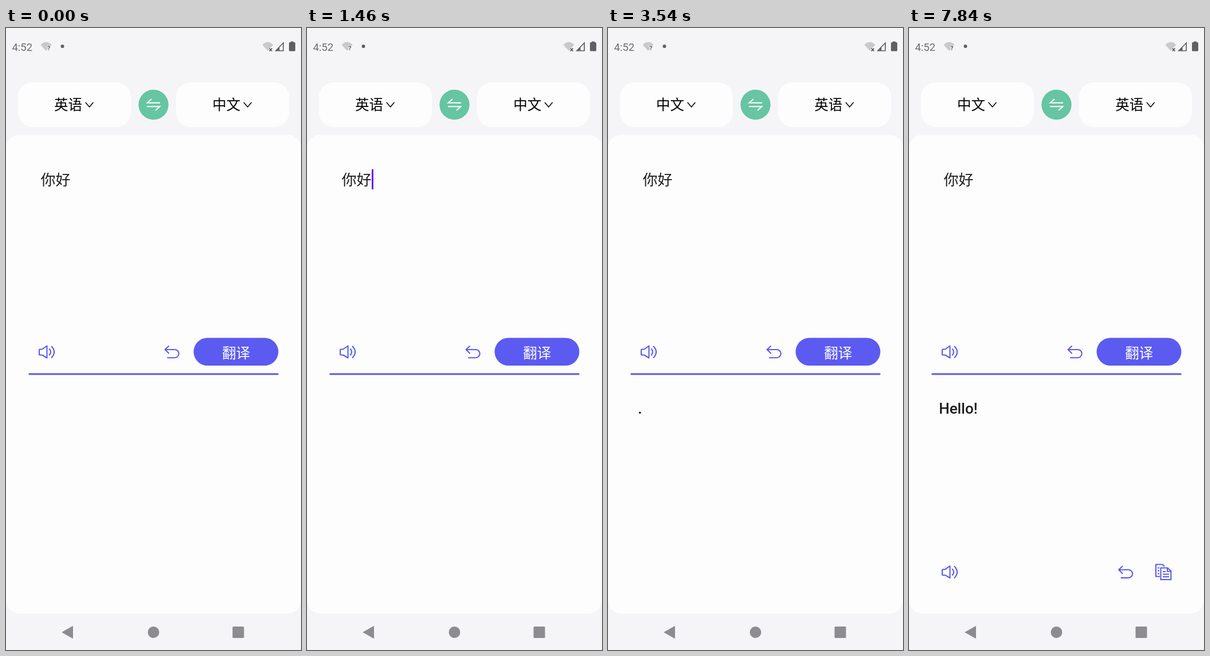
An HTML page that plays this animation: 515 by 1087 pixels, repeating every 8000 ms.

```html
<!DOCTYPE html>
<html lang="zh-CN">
<head>
<meta charset="utf-8">
<style>
html, body { margin: 0; width: 100%; height: 100%; overflow: hidden; background: #f5f5f7; }
svg { display: block; width: 515px; height: 1087px; }
.cjk { font-family: "Noto Sans CJK SC", "Noto Sans CJK", sans-serif; }
.label { font-size: 24.5px; font-weight: 500; }
.latin { font-family: Roboto, sans-serif; }
.icon { fill: none; stroke: #5c5cea; stroke-width: 2.1; stroke-linecap: round; stroke-linejoin: round; }
</style>
</head>
<body>
<svg viewBox="0 0 515 1087" xmlns="http://www.w3.org/2000/svg">
  <defs>
    <g id="speaker" class="icon">
      <path d="M58 562.5V570.5Q58 571.5 59 571.5H63L71.5 576.5V555.5L63 561.5H59Q58 561.5 58 562.5Z"/>
      <path d="M75.8 561Q80.4 566 75.8 571.5M79.6 556.5Q88.6 566 79.6 576"/>
    </g>
    <path id="undo" class="icon" d="M284 556L277.6 562L284 568.3M278 562H294.6A7.1 7.1 0 0 1 294.6 576.2H282"/>
    <path id="chevron" d="M138.8 130L145.6 138L152.4 130" fill="none" stroke="#111" stroke-width="1.7"/>
    <path id="wifi" d="M0 5Q9.5 -5 19 5L9.5 15.5Z" fill="#c9c9c9"/>
  </defs>
  <rect width="515" height="1087" fill="#f5f5f7"/>

  <g fill="#606062">
    <text class="latin" x="10.5" y="39.5" font-size="18.4" fill="#6c6c6e">4:52</text>
    <use href="#wifi" x="60.5" y="24.5"/>
    <text class="latin" x="72" y="38.5" font-size="11" font-weight="700" stroke="#f5f5f7" stroke-width="2" paint-order="stroke">?</text>
    <circle cx="98.5" cy="32" r="3"/>
    <use href="#wifi" x="447.5" y="24.5"/>
    <path d="M459.8 35.5L464.4 40.5M464.4 35.5L459.8 40.5" stroke="#f5f5f7" stroke-width="4"/>
    <path d="M459.8 35.5L464.4 40.5M464.4 35.5L459.8 40.5" stroke="#505052" stroke-width="1.7"/>
    <path d="M469 40.5L485 24V40.5ZM477.5 39H483.3V28L477.5 34Z" fill-rule="evenodd"/>
    <path d="M497 25V23.5H502V25H503.5Q505 25 505 26.5V39Q505 40.5 503.5 40.5H495.5Q494 40.5 494 39V26.5Q494 25 495.5 25Z"/>
  </g>

  <g fill="#fdfdfd">
    <rect x="21" y="95" width="197" height="78" rx="25"/>
    <rect x="297" y="95" width="197" height="78" rx="25"/>
    <rect y="186.5" width="515" height="837" rx="24"/>
  </g>
  <text id="from" class="cjk label" x="84" y="143"></text>
  <text id="to" class="cjk label" x="360.3" y="143"></text>
  <use href="#chevron"/>
  <use href="#chevron" x="276.2"/>
  <circle cx="257.5" cy="134" r="26.2" fill="#66c5a3"/>
  <path d="M254 124L246.5 130.8H269M246 137.2H268.5L261 144" fill="none" stroke="#fff" stroke-width="2"/>

  <text class="cjk" x="60.5" y="275" font-size="26" fill="#1c1c1e">你好</text>
  <rect id="caret" x="113" y="247" width="2.8" height="35" fill="#6200ee"/>

  <use href="#speaker"/>
  <use href="#undo"/>
  <rect x="327.5" y="541.5" width="148" height="48.5" rx="24.2" fill="#5b5bf1"/>
  <text class="cjk label" x="377.2" y="577" fill="#fff">翻译</text>
  <rect x="39.5" y="603.3" width="436" height="3" fill="#5b5bf1"/>

  <text id="output" class="latin" x="52.2" y="674" font-size="26" font-weight="500" fill="#1c1c1e"></text>
  <g id="tools">
    <use href="#speaker" y="384.7"/>
    <use href="#undo" x="88.5" y="384.7"/>
    <g class="icon" stroke-width="2" style="stroke-linecap:butt;stroke-linejoin:miter">
      <path d="M438 958.5H431V937.5H442.5L446 941"/>
      <path d="M439.5 943.5H451.5L457.3 949V964H439.5Z"/>
      <path d="M451 944V949.5H457M443 950H448M443 954.5H454M443 959H454M434 943.5H437M434 948.5H437M434 953.5H437"/>
    </g>
  </g>

  <g fill="#8c8c91">
    <path d="M98 1056L116.5 1045.5V1066.5Z" stroke="#8c8c91" stroke-linejoin="round"/>
    <circle cx="257.5" cy="1056" r="10"/>
    <rect x="395.5" y="1046" width="20" height="20" rx="1.5"/>
  </g>
</svg>
<script>
const LOOP = 8000, SWAP = 2250, START = 3340, DONE = 6630;
const DOT_STEP = 600, BLINK = 500, BLINK_START = 40;
const el = id => document.getElementById(id);
const from = el('from'), to = el('to'), caret = el('caret'), output = el('output'), tools = el('tools');

function setText(node, text) {
  if (node.textContent !== text) node.textContent = text;
}

function show(node, on) {
  node.setAttribute('visibility', on ? 'visible' : 'hidden');
}

function caretOn(t) {
  if (t > 2540 && t < START) return false;
  return t >= BLINK_START && Math.floor((t - BLINK_START) / BLINK) % 2 === 0;
}

function result(t) {
  if (t < START) return '';
  if (t >= DONE) return 'Hello!';
  const step = Math.floor((t - START) / DOT_STEP);
  return '.'.repeat((step + 1) % 4);
}

function draw(t) {
  const swapped = t >= SWAP;
  setText(from, swapped ? '中文' : '英语');
  setText(to, swapped ? '英语' : '中文');
  setText(output, result(t));
  show(caret, caretOn(t));
  show(tools, t >= DONE);
}

const begin = performance.now();
function tick() {
  draw((performance.now() - begin) % LOOP);
  requestAnimationFrame(tick);
}
tick();
</script>
</body>
</html>
```
